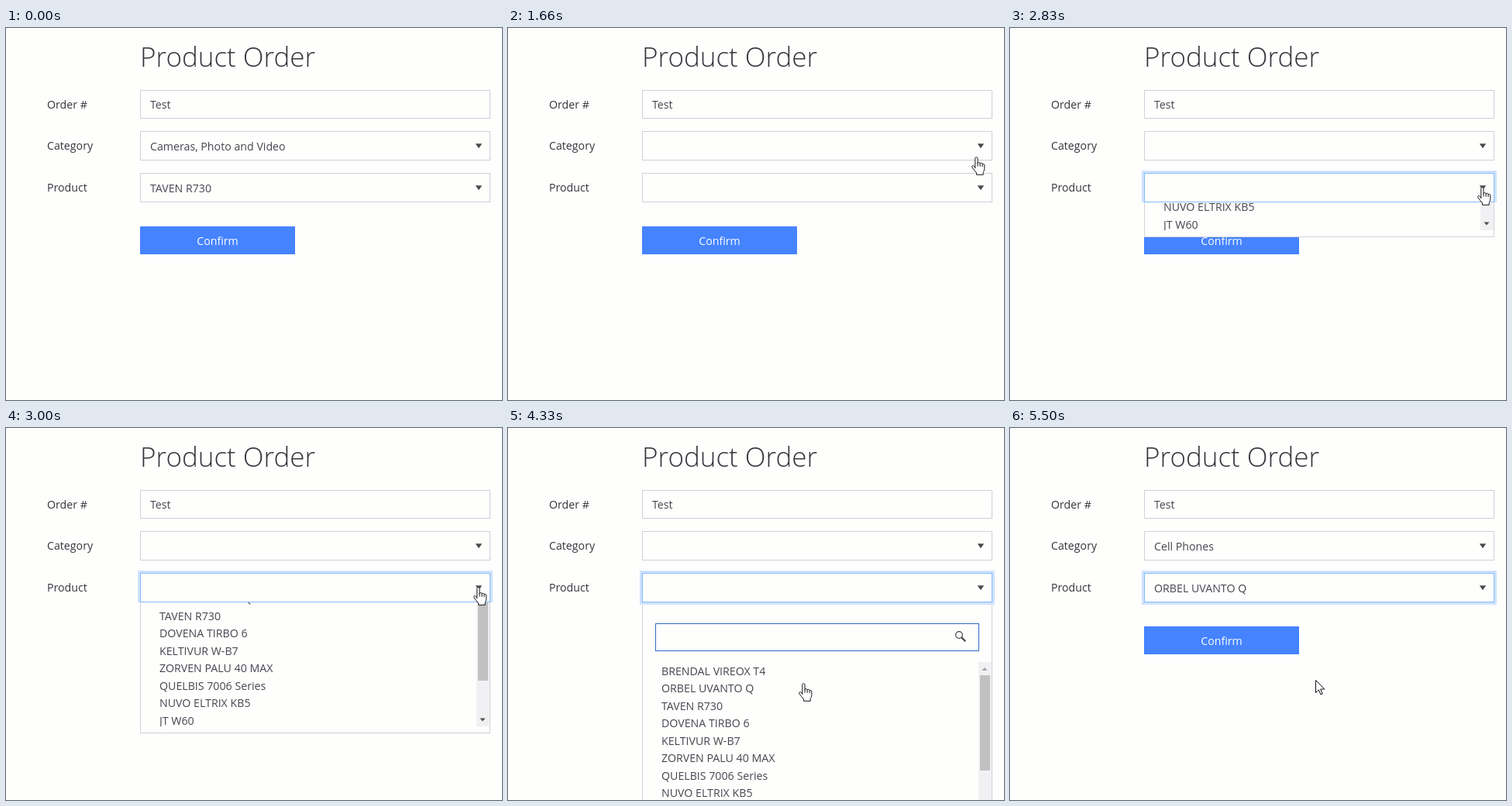
Recreate the animation shown at these times as an HTML page. Size 640 by 480 pixels, loop 5.66 s.

```html
<!DOCTYPE html>
<html lang="en">
<head>
<meta charset="utf-8">
<title>Product Order</title>
<style>
  html, body { margin: 0; width: 100%; height: 100%; overflow: hidden; background: #fefefd; }
  svg { display: block; width: 640px; height: 480px; }
  text { font: 14.2px "Open Sans", "Noto Sans", sans-serif; fill: #45474f; white-space: pre; }
  .title { font-size: 35px; font-weight: 300; fill: #33363c; }
  .label { fill: #33363c; }
  .white { fill: #fff; }
  .field { fill: #fefefd; stroke: #cfcfdb; }
  .field.hot { stroke: #a3cdf8; }
  .field.focus { stroke: #85bbf8; }
  .ring { fill: #cfe2fd; }
  .popup { fill: #fefefd; stroke: #d2d2da; }
  .search { fill: #fefefd; stroke: #cfcfdb; }
  .search.focus { stroke: #2d6cc0; }
  .line { fill: none; stroke: #3a3c42; stroke-width: 1.2; }
  .caret { fill: #4a4a4a; }
  .pointer { fill: #fff; stroke: #111; stroke-linejoin: round; }
</style>
</head>
<body>
<svg viewBox="0 0 640 480">
  <defs>
    <clipPath id="below"><rect x="170" y="225" width="470" height="255"/></clipPath>
    <clipPath id="rows"><rect x="174" y="302" width="450" height="199"/></clipPath>
    <path id="caret" class="caret" d="M-4.2-2.8H4.2L0 3.2Z"/>
    <g id="busy" class="line">
      <path d="M-5.8-4.6Q-9.4 0-5.8 4.6M5.8-4.6Q9.4 0 5.8 4.6M-2.4-2.6Q-4.2 0-2.4 2.6M2.4-2.6Q4.2 0 2.4 2.6"/>
    </g>
  </defs>

  <text class="title" x="173" y="50">Product Order</text>
  <text class="label" x="53" y="104">Order #</text>
  <text class="label" x="53" y="157">Category</text>
  <text class="label" x="53" y="211">Product</text>

  <rect class="field" x="173.5" y="80.5" width="451" height="36"/>
  <text x="186" y="104">Test</text>

  <rect class="field" id="catBox" x="173.5" y="133.5" width="451" height="37"/>
  <text id="cat" x="186" y="158"></text>
  <use id="catCaret" href="#caret" x="610" y="152"/>
  <use id="catBusy" href="#busy" x="604" y="152"/>
  <path id="clear" class="line" d="M590 148l8 8m0-8l-8 8"/>

  <rect x="173" y="256" width="200" height="36" fill="#4583ff"/>
  <text class="white" x="273" y="280" text-anchor="middle">Confirm</text>

  <g id="drop" clip-path="url(#below)">
    <g id="slide">
      <rect class="popup" x="173.5" y="224.5" width="451" height="285"/>
      <rect class="search" id="search" x="190.5" y="252.5" width="417" height="35"/>
      <g class="line"><circle cx="582" cy="267" r="4.3"/><path d="M585.3 270.2l5 5" stroke-width="2"/></g>
      <g id="list" clip-path="url(#rows)"></g>
      <rect x="607" y="302" width="17" height="199" fill="#f1f1f3"/>
      <rect x="609" y="319" width="13" height="123" fill="#c1c1c2"/>
      <path d="M611.5 313h7l-3.5-4Z" fill="#a3a3a3"/>
      <path d="M611.5 490.5h7l-3.5 4Z" fill="#505050"/>
    </g>
  </g>

  <path id="ring" class="ring" fill-rule="evenodd" d="M170 184H628V228H170ZM173 187V225H625V187Z"/>
  <rect class="field" id="prodBox" x="173.5" y="187.5" width="451" height="37"/>
  <text id="prod" x="186" y="212"></text>
  <use id="prodCaret" href="#caret" x="610" y="206"/>
  <use id="prodBusy" href="#busy" x="604" y="206.5"/>

  <g id="hand" class="pointer">
    <path d="M-1.2 15V2.4C-1.2 0 2 0 2 2.4V8.4C2.5 7 4.8 7.2 5.1 8.9 5.7 7.8 7.8 8 8.1 9.7 8.9 8.9 10.8 9.3 10.8 11.2V15.5C10.8 18 9.5 19 9.2 20.5V23.3H.6V21C-1.2 18.5-3.7 16.5-5.2 13.6-6 11.6-3.6 11-2.6 12.3L-1.2 14.2"/>
    <path fill="none" d="M2 8v4.5M5.1 8.8v4M8.1 9.7v3.4"/>
  </g>
  <path id="arrow" class="pointer" d="M.5.5V16.5L4.3 12.9 7 19 9.2 18 6.7 12H11.8Z"/>
</svg>
<script>
const LOOP = 5660;
const $ = id => document.getElementById(id);
const PICKED = "ORBEL UVANTO Q", FIRST = "TAVEN R730";
const ITEMS = ["BRENDAL VIREOX T4", PICKED, FIRST, "DOVENA TIRBO 6", "KELTIVUR W-B7",
  "ZORVEN PALU 40 MAX", "QUELBIS 7006 Series", "NUVO ELTRIX KB5", "JT W60"];

$("list").innerHTML = ITEMS.map((name, i) =>
  `<text x="198" y="${319 + 22.45 * i}">${name}</text>`).join("");

// [time, x, y] of the pointer tip
const PATH = [
  [330, 602, 159], [500, 594, 150], [1660, 604, 166], [1830, 622, 194],
  [2000, 627, 221], [2160, 612, 226], [2330, 597, 199], [2500, 603, 202],
  [2660, 609, 205], [3330, 582, 226], [3500, 486, 280], [3660, 392, 315],
  [3830, 292, 296], [4000, 208, 260], [4160, 385, 324], [4330, 381, 329],
  [5500, 394, 325]
];
// [time, vertical offset of the list]
const SLIDE = [[2830, -240], [3000, -116], [3160, -22], [3330, 0]];

const at = (steps, t) => steps.findLast(s => t >= s[0]);
const show = (id, on) => $(id).setAttribute("visibility", on ? "visible" : "hidden");
const move = (id, x, y) => $(id).setAttribute("transform", `translate(${x} ${y})`);

function draw(t) {
  const within = (a, b) => t >= a && t < b;
  const focus = t >= 2830, open = within(2830, 4660);
  const catBusy = within(1160, 1330), prodBusy = within(4660, 4830);

  $("cat").textContent = t < 1160 ? "Cameras, Photo and Video" : t >= 4830 ? "Cell Phones" : "";
  $("prod").textContent = t < 1330 ? FIRST : t >= 4660 ? PICKED : "";
  $("catBox").classList.toggle("hot", within(830, 1330));
  $("prodBox").classList.toggle("focus", focus);
  show("clear", within(500, 1160));
  show("catCaret", !catBusy);
  show("catBusy", catBusy);
  show("prodCaret", !prodBusy);
  show("prodBusy", prodBusy);
  show("ring", focus);

  // While sliding, the list covers the lower edge of the ring.
  const sliding = within(2830, 3330);
  $("ring").setAttribute("d", sliding
    ? "M170 184H628V225H170ZM173 187V225H625V187Z"
    : "M170 184H628V228H170ZM173 187V225H625V187Z");
  $("drop").style.display = open ? "" : "none";
  if (open) move("slide", 0, at(SLIDE, t)[1]);
  $("search").classList.toggle("focus", !sliding);

  const p = at(PATH, t), isArrow = t >= 5500;
  show("hand", p && !isArrow);
  show("arrow", isArrow);
  if (p) move(isArrow ? "arrow" : "hand", p[1], p[2]);
}

const start = performance.now();
function tick() {
  draw((performance.now() - start) % LOOP);
  requestAnimationFrame(tick);
}
tick();
</script>
</body>
</html>
```
